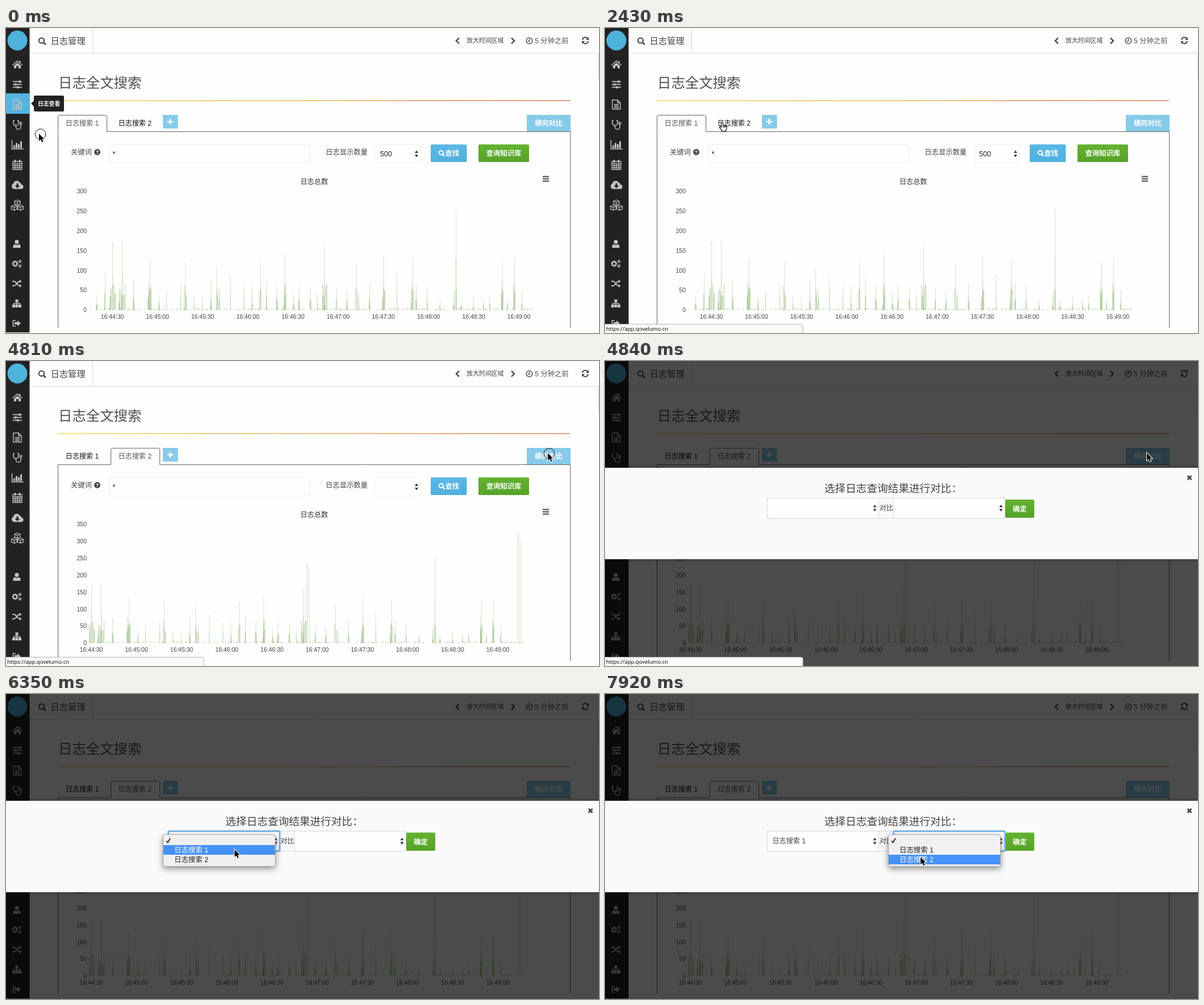
Write an HTML page with a canvas that moves like this. It is 1043 px wide and 537 px high and loops after 8 s.

```html
<!DOCTYPE html>
<html lang="zh-CN">
<head>
<meta charset="utf-8">
<title>日志管理</title>
<style>
html, body { margin: 0; width: 100%; height: 100%; overflow: hidden; background: #fff; }
canvas { display: block; }
</style>
</head>
<body>
<canvas id="stage" width="1043" height="537"></canvas>
<script>
const ctx = document.getElementById('stage').getContext('2d');
const SANS = '"Liberation Sans", "Noto Sans CJK SC", "Noto Sans CJK", sans-serif';
const LOOP = 8000;
const BLUE = '#56b4e0', PALE = '#87cae9', DARK = '#444', GREY = '#c4c4c4';

// ---------- helpers ----------
const clamp = p => Math.max(0, Math.min(1, p));
const smooth = p => p * p * (3 - 2 * p);

let seed = 23;
const random = () => (seed = (seed * 16807) % 2147483647) / 2147483647;

function text(s, x, y, size, color = DARK, { bold = false, align = 'left', font = SANS } = {}) {
  ctx.font = `${bold ? 'bold ' : ''}${size}px ${font}`;
  ctx.textAlign = align;
  ctx.fillStyle = color;
  ctx.fillText(s, x, y + size * 0.37);
}

function rect(x, y, w, h, fill, stroke, r = 0, lineWidth = 1) {
  ctx.beginPath();
  ctx.roundRect(x, y, w, h, r);
  if (fill) { ctx.fillStyle = fill; ctx.fill(); }
  if (stroke) { ctx.strokeStyle = stroke; ctx.lineWidth = lineWidth; ctx.stroke(); }
}

// Fills the path, or strokes it when a width is given.
function icon(x, y, d, width = 0, color = GREY) {
  const path = new Path2D(d);
  ctx.save();
  ctx.translate(x, y);
  ctx.fillStyle = ctx.strokeStyle = color;
  ctx.lineWidth = width;
  if (width) ctx.stroke(path); else ctx.fill(path, 'evenodd');
  ctx.restore();
}

function withShadow(blur, offset, paint) {
  ctx.save();
  ctx.shadowColor = 'rgba(0,0,0,.45)';
  ctx.shadowBlur = blur;
  ctx.shadowOffsetY = offset;
  paint();
  ctx.restore();
}

function gradient(x0, y0, x1, y1, ...colors) {
  const g = ctx.createLinearGradient(x0, y0, x1, y1);
  colors.forEach((c, i) => g.addColorStop(i / (colors.length - 1), c));
  return g;
}

function button(x, y, w, h, label, top, bottom = top, inset = 0) {
  rect(x, y, w, h, gradient(0, y, 0, y + h, top, bottom), null, top === bottom ? 0 : 2);
  text(label, x + w / 2 + inset, y + h / 2, 12.3, '#fff', { bold: true, align: 'center' });
}

const field = (x, y, w, h, border) => rect(x + .5, y + .5, w, h, '#fefefe', border, 3);
const spinner = (x, y) => icon(x, y, 'M-3-1.5L0-6L3-1.5ZM-3 1.5H3L0 6Z', 0, '#333');

// ---------- icon shapes ----------
const circle = (r, x = 0, y = 0) => `M${x - r} ${y}a${r} ${r} 0 1 0 ${2 * r} 0a${r} ${r} 0 1 0 ${-2 * r} 0`;
const box = (x, y, w, h = w) => `M${x} ${y}h${w}v${h}h${-w}Z`;
const cube = (x, y) => `M${x} ${y}l5 2v5l-5 2l-5-2v-5Zl5 2v5l-5 2l-5-2v-5ZM${x - 5} ${y + 2}l5 2l5-2m-5 2v5`;

function gear(r, x, y) {
  let d = circle(r, x, y);
  for (let i = 0; i < 8; i++) {
    const c = Math.cos(i * Math.PI / 4), s = Math.sin(i * Math.PI / 4);
    d += `M${x + c * r} ${y + s * r}L${x + c * r * 1.6} ${y + s * r * 1.6}`;
  }
  return d;
}

function magnifier(x, y, r, color) {
  icon(x, y, circle(r), 2, color);
  icon(x, y, `M${r * .7} ${r * .7}L${r * 1.6} ${r * 1.6}`, 2.6, color);
}

// Each icon is a list of layers: [path, line width or nothing for a fill].
const topIcons = [
  [['M-9 1L0-7L9 1L8 2L0-5L-8 2ZM-6 2.5L0-3L6 2.5V7H2V3H-2V7H-6Z'], ['M4.5-6V-3', 2]],
  [['M-8-5H8M-8 0H8M-8 5H8', 1.8], ['M4-7V-3M-3-2V2M1 3V7', 3]],
  [['M-7-8H2L7-3V8H-7ZM2-8V-3H7M-4 0H4M-4 2.7H4M-4 5.4H4', 1.4]],
  [['M-5-7.5H-7V-3A4.5 4.5 0 0 0 2-3V-7.5H0M-2.5 1.5V4A4 4 0 0 0 6 4V-1' + circle(1.8, 6, -2.5), 1.5]],
  [['M-9.5-8V7.5H11', 1.5], [box(-7, 1, 3, 5) + box(-3, -3, 3, 9) + box(1, -1, 3, 7) + box(5, -6, 3, 12)]],
  [[box(-8, -6, 16, 14) + 'M-8-2H8M-8 1.3H8M-8 4.6H8M-4-2V8M0-2V8M4-2V8', 1.3], ['M-4-9V-4M4-9V-4', 2.4]],
  [['M-5.5 7A5 5 0 0 1-7-2.5A6 6 0 0 1 4-4.5A4 4 0 0 1 7-1A4 4 0 0 1 6 7ZM-1.5-3H1.5V1H4.5L0 5.5L-4.5 1H-1.5Z']],
  [[cube(0, -9) + cube(-5.5, 0) + cube(5.5, 0), 1.2]]];
const bottomIcons = [
  [[circle(3.6, 0, -3.4) + 'M-6.5 7C-7 1-4 .3-3 1Q0 3 3 1C4 .3 7 1 6.5 7Z']],
  [[gear(3.4, -3, 0), 2.2], [gear(1.7, 5.5, -4) + gear(1.7, 5.5, 4), 1.2]],
  [['M-8-4H-5C-1-4 1 4 5 4H6M-8 4H-5C-1 4 1-4 5-4H6', 1.9], ['M5-7L8.5-4L5-1ZM5 1L8.5 4L5 7Z']],
  [[box(-2.5, -7, 5) + box(-8, 2, 5) + box(-2.5, 2, 5) + box(3, 2, 5)], ['M0-2V2M-5.5 3V0H5.5V3', 1.3]],
  [['M-2-5H-6.5V5H-2', 1.7], ['M-4-2H1V-5L7 0L1 5V2H-4Z']]];
const ARROW = 'M0 0V13L3 10.2L5.2 15L7.4 14L5.2 9.6H9.2Z';
const HAND = 'M-1.6 8.5V1.4Q-1.6 0 0 0T1.6 1.4V5.5Q5 5 8 7.4Q8.4 11 6.6 13V15.5H-.6V13.6L-4.6 9.2Q-5 7-3.2 7.2Z';

// ---------- chart ----------
const LEFT = 146, RIGHT = 940, TOP = 287, BASE = 496.5, STEP = 79.45;
const SHIFT = 37; // how far the second search has scrolled on

const bursts = [[187, 172], [204, 174], [253, 130], [315, 123], [370, 108], [447, 120], [490, 140],
  [560, 160], [616, 115], [664, 138], [715, 130], [791, 255], [873, 120], [894, 130]];
const lateBursts = [[565, 240], [937, 330]];

const bars = [];
const addBar = (x, v, alpha, late = false) => bars.push({ x, v, alpha, late });

// A thin tall line over a denser foot that thins out to both sides.
function addBurst(x, v, spread) {
  addBar(x, v, .35);
  addBar(x, v * .5, .35);
  for (let d = -spread; d <= spread; d++)
    if (d && random() < .6) addBar(x + d, Math.min(70, v * .5) * (.5 + random() * .5), .5);
}
for (const [x, v] of bursts) addBurst(x, v, v > 150 && v < 200 ? 5 : 2);
for (const [x, v] of lateBursts) for (const d of [0, 2, 5]) addBar(x + d, v * (1 - d / 60), .3, true);
for (let x = 159; x < 920; x += 8 + random() * 18) addBurst(Math.round(x), 25 + 70 * random() ** 1.5, 1);
for (let x = 148; x < 948; x++) if (random() < .45) addBar(x, 1 + random() * 4, .5);

function drawChart(second, reveal, grid) {
  const max = second ? 350 : 300, unit = (BASE - TOP) / max;
  const shift = second ? SHIFT : 0, firstTick = 187 - shift;
  text('日志总数', 542, 270, 12.2, '#333', { align: 'center' });
  icon(949.5, 265.5, 'M-5.5-4H5.5M-5.5 0H5.5M-5.5 4H5.5', 1.8, DARK);
  for (let v = 0; v <= max; v += 50) {
    const y = BASE - v * unit;
    if (grid) icon(0, Math.round(y) + .5, `M${LEFT} 0H${RIGHT}`, 1, '#f1f1f1');
    text(v, 142, y, 10.5, DARK, { align: 'right' });
  }
  for (let i = 0; i < 10; i++) {
    const x = firstTick + i * STEP, half = i + 1;
    if (grid) icon(Math.round(x) - .5, 0, `M0 ${TOP}V${BASE}`, 1, '#f1f1f1');
    text(`16:${44 + (half >> 1)}:${half % 2 ? '30' : '00'}`, x, 508, 10.4, DARK, { align: 'center' });
  }
  const end = second ? 914 : 926, edge = LEFT + (end - LEFT) * reveal;
  for (const b of bars) {
    const x = b.x - shift;
    if (x < LEFT || x > edge || (b.late && !second)) continue;
    ctx.fillStyle = `rgba(140,178,112,${b.alpha})`;
    ctx.fillRect(x, BASE - b.v * unit, 1, b.v * unit);
  }
}

// ---------- page ----------
function drawSidebar(hover) {
  rect(0, 0, 41.5, 536, '#222');
  ctx.globalAlpha = hover;
  rect(0, 115, 41.5, 36, BLUE);
  rect(49, 119, 53, 28, '#222', null, 2);
  icon(49, 133, 'M0-5L-5 0L0 5Z', 0, '#222');
  text('日志查看', 56, 133, 9.8, '#fff', { bold: true });
  ctx.globalAlpha = 1;
  icon(20, 22, circle(17.5), 0, '#4db3dc');
  const column = (icons, x, y, gap) => icons.forEach((layers, i) =>
    layers.forEach(([d, width]) => icon(x, y + i * gap, d, width)));
  column(topIcons, 20, 64, 35.4);
  column(bottomIcons, 19, 380, 35);
}

function drawHeader() {
  icon(0, 44.5, 'M42 0H1043M152.5-45V0M1042.5 0V45', 1, '#d8d8d8');
  magnifier(62.5, 22, 4.6, DARK);
  text('日志管理', 78.5, 22.2, 15.3);
  icon(794, 22.5, 'M3-5L-2 0L3 5', 2.4, DARK);
  text('放大时间区域', 810, 22, 10.9);
  icon(892, 22.5, 'M-3-5L2 0L-3 5', 2.4, DARK);
  icon(920.5, 22.5, circle(5.3) + 'M0-3.5V.7H-3', 1.6, '#555');
  text('5 分钟之前', 930, 22.5, 12.3, '#555');
  icon(1019, 22, 'M-5-1A5 5 0 0 1 4-3.5M5 1A5 5 0 0 1-4 3.5', 1.9, DARK);
  icon(1019, 22, 'M6-6V-1H1ZM-6 6V1H-1Z', 0, DARK);
  text('日志全文搜索', 92, 96.3, 24.4, '#505050');
  rect(91, 127, 901, 1.5, gradient(91, 0, 992, 0, '#f5d65a', '#efb25c', '#e0775e'));
}

function drawPanel(second) {
  const left = second ? 184.5 : 91.5, right = left + 86;
  icon(0, 0, `M91.5 528V182.5H${left}V156q0-2.5 3-2.5H${right - 3}q3 0 3 2.5V182.5H992.5V528`, 1, '#666');
  text('日志搜索 1', 104.8, 168, 12.1, second ? '#111' : '#555');
  text('日志搜索 2', 197.5, 168, 12.1, second ? '#555' : '#111');
  rect(276, 153, 26.5, 24, PALE);
  icon(289, 165, 'M-5 0H5M0-5V5', 2.6, '#fff');
  button(916, 153, 77, 29, '横向对比', PALE);

  text('关键词', 114, 218, 12.3);
  icon(160.5, 218.5, circle(5.4), 0, DARK);
  text('?', 160.5, 218.5, 9, '#fff', { bold: true, align: 'center' });
  field(181, 205, 353, 32, '#ececec');
  text('*', 187.5, 221, 12.3, '#111');
  text('日志显示数量', 562.3, 218, 12.3);
  field(650, 205, 79, 32, '#ececec');
  if (!second) text('500', 658, 221.5, 12.5, '#222');
  spinner(722, 221.5);
  button(747, 205, 63.5, 31, '查找', '#5cb8e6', '#51b0dd', 6);
  magnifier(765.5, 219.5, 3.6, '#fff');
  button(831, 205, 89, 31, '查询知识库', '#63b231', '#57a228');
}

function drawMenu(x, pointerY) {
  withShadow(11, 4, () => rect(x, 247, 198, 56.5, '#f0f0f0', null, 4));
  rect(x + .5, 247.5, 197, 56, null, '#a8a8a8', 4);
  const row = Math.floor(clamp((pointerY - 249) / 51) * 2.99);
  const color = i => i === row ? '#fff' : '#222';
  rect(x + 1, 249 + row * 17, 196, 17, '#4591f7');
  icon(x + 9.5, 258, 'M-3.5 .5L-1 3.5L3.5-4', 1.8, color(0));
  for (const i of [1, 2]) text(`日志搜索 ${i}`, x + 20, 257.5 + i * 17, 12.4, color(i));
}

function drawModal(t, pointerY) {
  rect(0, 0, 1043, 537, 'rgba(0,0,0,.7)');
  withShadow(6, 0, () => rect(0, 188, 1043, 161, '#fafafa'));
  icon(1028, 205.5, 'M-3.5-3.5L3.5 3.5M3.5-3.5L-3.5 3.5', 2.6, DARK);
  text('选择日志查询结果进行对比：', 386, 224, 18.6);
  rect(285.5, 241.5, 418, 35.5, null, '#d2d2d2');
  for (const x of [285, 507]) {
    field(x, 241, 196, 35.5, '#dadada');
    spinner(x + 189.5, 259);
  }
  text('对比', 482.5, 258.5, 12.3);
  button(704, 244, 51, 32, '确定', '#63b231', '#57a228');
  if (t >= 7160) text('日志搜索 1', 294.5, 258.5, 12.1);
  if (t >= 5940) rect(t < 7330 ? 285.5 : 507.5, 241.5, 196, 35, null, '#7db4ec', 2, 3);
  if (t >= 6000 && t < 6650) drawMenu(276, pointerY);
  if (t >= 7390) drawMenu(498, pointerY);
}

function drawStatus() {
  rect(-2, 521.5, 350, 18, '#fafafa', '#b5b5b5', 3);
  text('https://app.qovelumo.cn', 2, 529, 9.5, '#000', { font: '"Open Sans", "Noto Sans", sans-serif' });
}

// ---------- pointer: moves as [start, end, x, y] ----------
const moves = [[60, 60, 58, 225], [200, 300, 58, 239], [450, 1220, 63, 134], [1310, 1780, 147, 158],
  [2310, 2490, 226, 169], [3400, 3490, 235, 171], [3540, 4520, 953, 162], [5200, 5700, 402, 267],
  [6180, 6350, 402, 274], [6590, 6980, 548, 257], [7620, 7920, 555, 287]];
const clicks = [0, 2750, 4780, 5940, 6590, 7330], CLICK = 60;

function pointerAt(t) {
  let x = 58, y = 186;
  for (const [from, to, toX, toY] of moves) {
    if (t < from) break;
    const p = smooth(clamp((t - from) / (to - from || 1)));
    const done = to === from ? 1 : p;
    x += (toX - x) * done;
    y += (toY - y) * done;
  }
  return [x, y];
}

function drawPointer(t, x, y, hand) {
  if (clicks.some(c => t >= c && t < c + CLICK)) icon(x + 2.5, y + 1, circle(9.3), 1, '#111');
  if (hand) {
    icon(x, y, HAND, 0, '#fff');
    icon(x, y, HAND + 'M1.6 5.5V9M4 6V9M6 6.6V9', 1.2, '#111');
  } else {
    icon(x, y, ARROW, 2, '#fff');
    icon(x, y, ARROW, 0, '#000');
  }
}

// ---------- timeline ----------
function draw(t) {
  const second = t >= 2810;
  const reveal = second ? clamp((t - 2860) / 300) : 1;
  const [x, y] = pointerAt(t);
  const overTab = x > 91 && x < 270 && y > 153 && y < 182;
  const overCompare = x > 916;
  rect(0, 0, 1043, 537, '#fefefe');
  drawHeader();
  drawPanel(second);
  drawChart(second, reveal, second && t < 4220);
  drawSidebar(t < 60 ? 1 : t < 200 ? .4 : 0);
  if (t >= 4840) drawModal(t, y);
  if (overTab || overCompare) drawStatus();
  drawPointer(t, x, y, overTab);
}

const start = performance.now();
function tick() {
  draw((performance.now() - start) % LOOP);
  requestAnimationFrame(tick);
}
tick();
</script>
</body>
</html>
```
